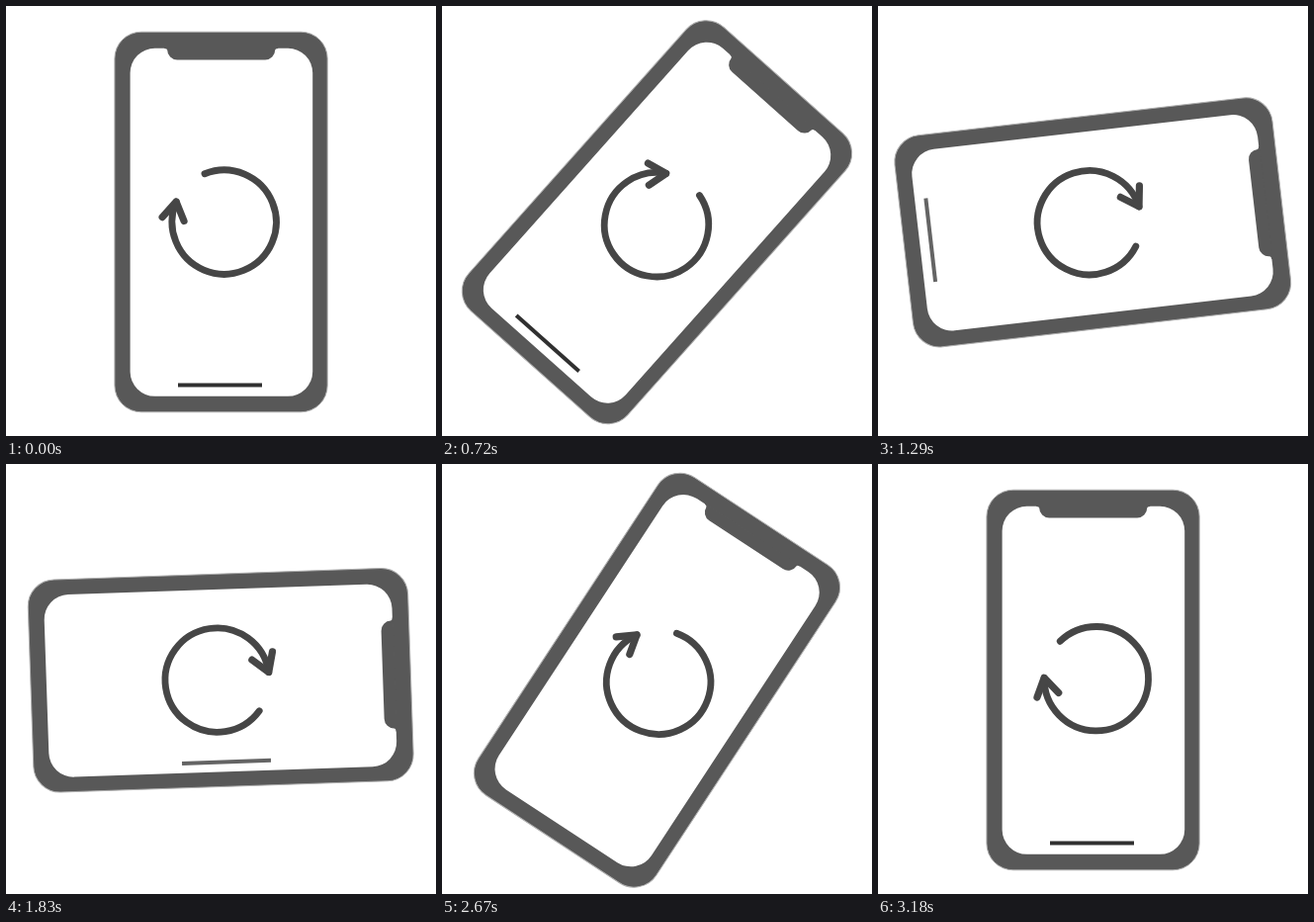
Write an HTML page with a canvas that moves like this. It is 435 px wide and 435 px high and loops after 3.78 s.

```html
<!DOCTYPE html>
<html lang="en">
<head>
<meta charset="utf-8">
<title>Rotate phone</title>
<style>
html, body { margin: 0; width: 100%; height: 100%; overflow: hidden; background: #fff; }
canvas { display: block; width: 435px; height: 435px; }
</style>
</head>
<body>
<canvas id="stage"></canvas>
<script>
const SIZE = 435, LOOP = 3780, STEP = 30;
const RAD = Math.PI / 180;
const canvas = document.getElementById('stage');
const ctx = canvas.getContext('2d');
const dpr = window.devicePixelRatio || 1;
canvas.width = canvas.height = Math.round(SIZE * dpr);

// linear progress of t between two times, held outside them
const ramp = (t, from, to) => Math.min(1, Math.max(0, (t - from) / (to - from)));

function box(x, y, w, h, r) {
  ctx.beginPath();
  ctx.roundRect(x, y, w, h, r);
}

function bar(x1, y1, x2, y2, alpha) {
  if (alpha <= 0) return;
  ctx.globalAlpha = alpha;
  ctx.lineWidth = 4;
  ctx.lineCap = 'butt';
  ctx.strokeStyle = '#303030';
  ctx.beginPath();
  ctx.moveTo(x1, y1);
  ctx.lineTo(x2, y2);
  ctx.stroke();
  ctx.globalAlpha = 1;
}

function notch() {
  const l = -54, r = 55, top = -176.5, low = -164, c = 10, f = 3;
  ctx.beginPath();
  ctx.moveTo(l - f, top);
  ctx.lineTo(l - f, top + 1);
  ctx.quadraticCurveTo(l, top + 1, l, top + f);
  ctx.arcTo(l, low, l + c, low, c);
  ctx.arcTo(r, low, r, top + f, c);
  ctx.lineTo(r, top + f);
  ctx.quadraticCurveTo(r, top + 1, r + f, top + 1);
  ctx.lineTo(r + f, top);
  ctx.fill();
}

function drawPhone(angle, portrait, landscape) {
  ctx.save();
  ctx.translate(217.2, 218.5);
  ctx.rotate(angle * RAD);
  box(-107.3, -192.3, 215.3, 384.6, 27);
  ctx.fillStyle = '#585858';
  ctx.fill();
  ctx.strokeStyle = '#b0b0b0';
  ctx.lineWidth = 1;
  ctx.stroke();
  box(-91.6, -175.7, 184.6, 352, 25);
  ctx.fillStyle = '#fff';
  ctx.fill();
  ctx.fillStyle = '#585858';
  notch();
  bar(-43.2, 165, 41.8, 165, portrait);
  bar(83, -48, 83, 42, landscape);
  ctx.restore();
}

function drawArrow(angle) {
  const R = 52.7, end = 203 * RAD, axis = 100, spread = 32, len = 21;
  const tipX = R * Math.cos(end), tipY = R * Math.sin(end);
  const wing = deg => [tipX + len * Math.cos(deg * RAD), tipY + len * Math.sin(deg * RAD)];
  ctx.save();
  ctx.translate(217.2, 217.6);
  ctx.rotate(angle * RAD);
  ctx.translate(3.5, 1);
  ctx.strokeStyle = '#464646';
  ctx.lineCap = ctx.lineJoin = 'round';
  ctx.lineWidth = 6.8;
  ctx.beginPath();
  ctx.arc(0, 0, R, -112 * RAD, end);
  ctx.stroke();
  ctx.lineWidth = 7.2;
  ctx.beginPath();
  ctx.moveTo(...wing(axis + spread));
  ctx.lineTo(tipX, tipY);
  ctx.lineTo(...wing(axis - spread));
  ctx.stroke();
  ctx.restore();
}

function draw(t) {
  const back = ramp(t, 1800, 3180);
  const phone = 90 * (ramp(t, 150, 1380) - back);
  const arrow = 152 * ramp(t, 0, 1410) - 174 * back;
  const portrait = 1 - ramp(t, 1260, 1380) + ramp(t, 3060, 3180);
  const landscape = ramp(t, 1290, 1410) - ramp(t, 1800, 1920);
  ctx.setTransform(dpr, 0, 0, dpr, 0, 0);
  ctx.fillStyle = '#fff';
  ctx.fillRect(0, 0, SIZE, SIZE);
  drawPhone(phone, portrait, landscape);
  drawArrow(arrow);
}

const start = performance.now();
function tick() {
  const t = (performance.now() - start) % LOOP;
  draw(Math.floor(t / STEP) * STEP);
  requestAnimationFrame(tick);
}
tick();
</script>
</body>
</html>
```
